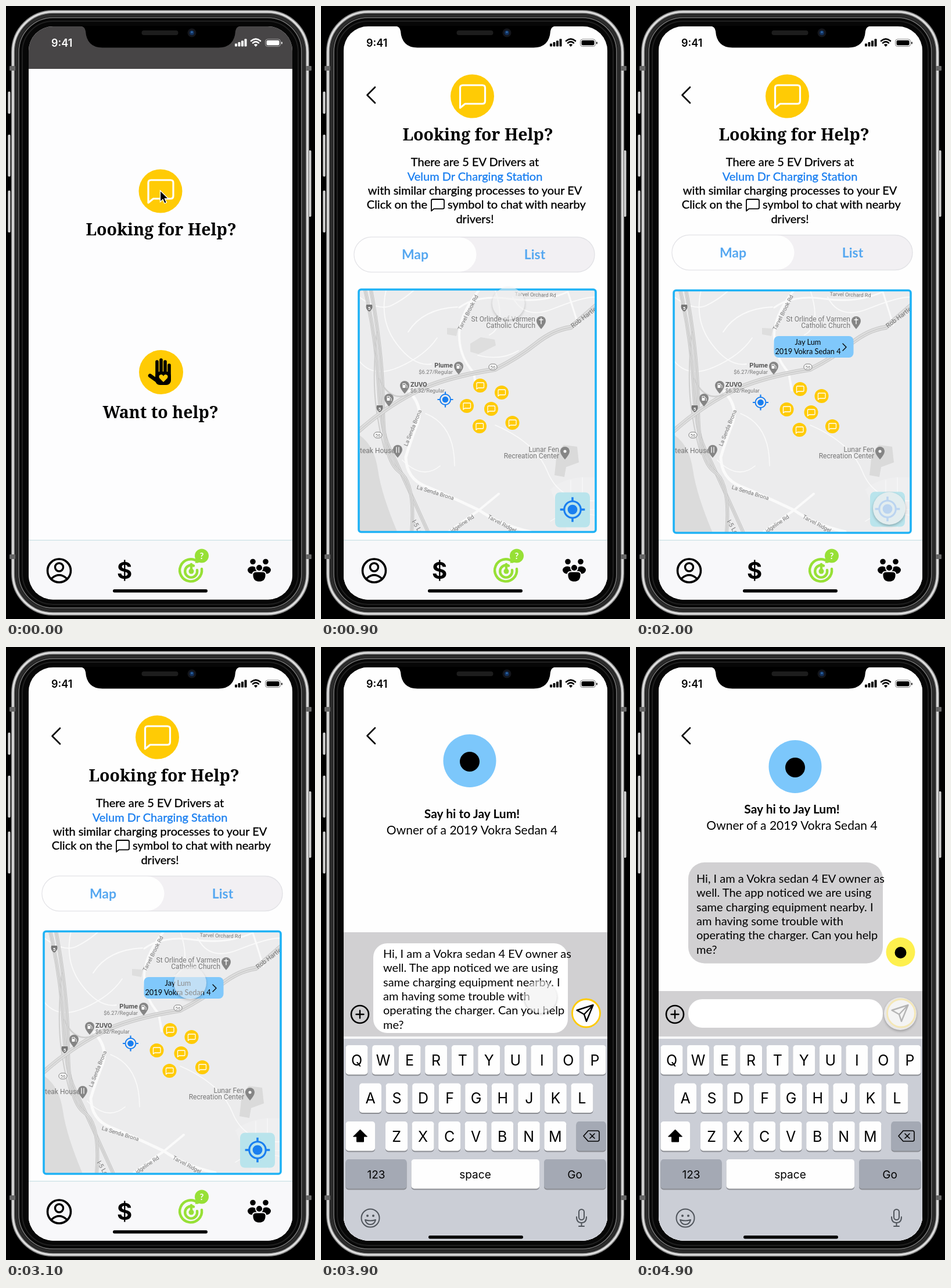
Recreate the animation shown at these times as an HTML page. Size 532x1053 px, loop 5000 ms.

```html
<!DOCTYPE html>
<html lang="en">
<head>
<meta charset="utf-8">
<title>Charging help prototype</title>
<style>
  html, body { margin: 0; width: 100%; height: 100%; overflow: hidden; background: #000; }
  svg { display: block; width: 100vw; height: 100vh; }
  text { font-family: Lato, sans-serif; white-space: pre; }
  .serif { font-family: "Noto Serif", serif; font-weight: 700; }
  .inter { font-family: Inter, sans-serif; }
  .map text { font-family: Roboto, sans-serif; fill: #777; }
  .mid { text-anchor: middle; }
  .end { text-anchor: end; }
  .bold { font-weight: 700; }
  .medium { stroke: currentColor; stroke-width: .35px; }
  .line { fill: none; stroke: #000; stroke-linecap: round; stroke-linejoin: round; }
  #touch { filter: drop-shadow(0 2px 2px rgba(0,0,0,.35)); }
</style>
</head>
<body>
<svg id="stage" viewBox="0 0 532 1053" xmlns="http://www.w3.org/2000/svg"></svg>
<script>
const YELLOW = '#ffcb05', BLUE = '#1a7ff0', SKY = '#7cc7fb', GREEN = '#97e036', PANEL = '#d1d0d2';

const text = (x, y, s, size, cls = '', attrs = '') =>
  `<text x="${x}" y="${y}" font-size="${size}" class="${cls}" ${attrs}>${s}</text>`;
const rect = (x, y, w, h, r, fill, attrs = '') =>
  `<rect x="${x}" y="${y}" width="${w}" height="${h}" rx="${r}" fill="${fill}" ${attrs}/>`;
const disc = (x, y, r, fill, attrs = '') => `<circle cx="${x}" cy="${y}" r="${r}" fill="${fill}" ${attrs}/>`;
const line = (d, width, color = '#000') => `<path class="line" d="${d}" stroke-width="${width}" style="stroke:${color}"/>`;
const group = (id, body, attrs = '') => `<g id="${id}" ${attrs}>${body}</g>`;

function chatIcon(x, y, w, h, color, width) {
  const r = h * .12, bottom = y + h * .82;
  return line(`M${x} ${y + h}V${y + r}q0 ${-r} ${r} ${-r}H${x + w - r}q${r} 0 ${r} ${r}V${bottom - r}q0 ${r} ${-r} ${r}H${x + h * .22}Z`, width, color);
}
const chatBadge = (x, y) => disc(x, y, 37.5, YELLOW) + chatIcon(x - 21, y - 19, 43, 39, '#fff', 3.2);
const chatDot = ([x, y]) => disc(x, y, 12, YELLOW) + chatIcon(x - 6, y - 5, 12.5, 11, '#fff', 1.3);
const chevron = y => line(`M93 ${y - 13.5}L79.5 ${y}L93 ${y + 13.5}`, 2.6);

function target(x, y, s) {
  return `<g transform="translate(${x} ${y}) scale(${s})">` + disc(0, 0, 5.3, BLUE) +
    disc(0, 0, 9, 'none', `stroke="${BLUE}" stroke-width="2"`) +
    `<path d="M0-13.5v4.5M0 9v4.5M-13.5 0h4.5M9 0h4.5" stroke="${BLUE}" stroke-width="2.2"/></g>`;
}

function status(color) {
  const bars = [5, 7.5, 10, 13].map((h, i) => rect(394 + i * 5.5, 69.5 - h, 4, h, 1, color)).join('');
  return text(78, 69.5, '9:41', 18, 'inter', `font-weight="600" fill="${color}"`) + bars +
    `<path d="M430 70l-3.2-3.4q3.2-2.6 6.4 0z" fill="${color}"/>` +
    line('M425 63.4q5-4.2 10 0M422 60q8-6.6 16 0', 2.6, color) +
    rect(446.5, 57, 26, 12.5, 4, 'none', `stroke="${color}" stroke-opacity=".5"`) +
    rect(448.5, 59, 22, 8.5, 2.2, color) + rect(474, 61.5, 1.6, 4, .8, color);
}

function nav() {
  const people = [425, 447].map(x => disc(x, 954.5, 4.8, '#000') +
    `<ellipse cx="${x + (x < 436 ? -1 : 1)}" cy="969" rx="8" ry="6.5"/>`).join('');
  return rect(39, 917, 454, 103, 0, '#f8f8fa') + rect(39, 917, 454, 1.2, 0, '#c9e0e4') +
    disc(91.5, 970, 20, 'none', 'stroke="#000" stroke-width="3.6"') +
    disc(91.5, 964, 7, 'none', 'stroke="#000" stroke-width="3.4"') +
    line('M79 983q12.5-11 25 0', 3.4) +
    text(204, 984, '$', 40, 'mid inter bold') +
    line('M330 954.5A19 19 0 1 0 337 967M323 961.5A10.5 10.5 0 1 0 329 969M319 971V959', 4.4, GREEN) +
    disc(319, 971, 4.5, GREEN) + disc(337, 944.5, 12, GREEN) +
    `<path d="M326 946v11l10-2z" fill="${GREEN}"/>` +
    text(337, 950, '?', 15, 'mid bold', 'fill="#fff"') + people +
    `<path d="M424.5 977q0-5.5 6-5.5h11q6 0 6 5.5q0 12.5-11.5 12.5t-11.5-12.5z" stroke="#f8f8fa" stroke-width="1.8"/>` +
    disc(436, 965, 6, '#000', 'stroke="#f8f8fa" stroke-width="1.8"') +
    rect(184, 1002, 163, 5.5, 2.7, '#000');
}

function home() {
  const fingers = line('M260 611V634M267 608V632M274 611V632M281 617V635', 5.6) + line('M248 635L262 645', 6.5);
  return rect(39, 35, 454, 985, 0, '#fdfdfe') + rect(39, 35, 454, 73, 0, '#474546') + status('#fff') +
    chatBadge(266, 318) + text(267, 394, 'Looking for Help?', 28.5, 'serif mid') +
    disc(267, 629, 38, YELLOW) + fingers + rect(257, 628, 27, 23, 8, '#000') +
    `<path d="M271 646l-7-7q-2-5 3-6q3 0 4 3q1-3 4-3q5 1 3 6z" fill="${YELLOW}"/>` +
    text(266, 708, 'Want to help?', 28.5, 'serif mid') + nav();
}

function pin(x, y, glyph = '') {
  return `<path d="M${x - 8} ${y - 1}a8 8 0 0 1 16 0q0 5-8 14q-8-9-8-14z" fill="#858585"/>` + glyph;
}
const fuel = (x, y) => pin(x, y, rect(x - 3.5, y - 5, 5, 8, .8, '#fff') +
  line(`M${x + 2} ${y - 3}l2 2v4`, 1, '#fff') + rect(x - 2.5, y - 4, 3, 2, 0, '#858585'));

function map() {
  const road = (d, w = 4) => line(d, w, '#fafafa');
  const freeway = (d, w = 7) => line(d, w, '#c6c6c6') + line(d, w - 2, '#dedede') + line(d, 1, '#c2c2c2');
  const tilted = (x, y, angle, s, size = 9.5) =>
    text(0, 0, s, size, 'mid', `transform="translate(${x} ${y}) rotate(${angle})"`);
  const oval = (x, y) => rect(x - 7, y - 5, 14, 10, 5, '#fff', 'stroke="#777"') + text(x, y + 3, '56', 8, 'mid');
  const shield = (x, y) => `<path d="M${x - 5} ${y - 6}h10q2 8-5 12q-7-4-5-12z" fill="#777"/>` +
    text(x, y + 3, '5', 8, 'mid bold', 'style="fill:#fff"');
  return rect(65, 487, 408, 418, 4, '#ececed') +
    '<path d="M66 737q26 18 32 60t34 108H66z" fill="#dbdbdb"/>' +
    '<path d="M402 806l4-38 12-14 23 3 3 27-22 8-3 17z" fill="#dadada"/>' +
    '<path d="M257 580l18-11 24 4 2 10-30 15-14-4zM217 553l19 1-3 13-16-3z" fill="#dedede"/>' +
    '<path d="M395 830q30-25 77-20v92h-48z" fill="#efeff0"/>' +
    road('M66 500Q100 525 122 514T160 488M112 488Q100 540 130 580T190 615', 1.8) +
    road('M150 560Q175 520 235 517M300 488Q320 550 290 565M330 500Q350 540 400 520T472 500', 1.8) +
    road('M66 610Q90 640 135 620T200 570M270 600Q310 610 340 592M180 700Q230 720 230 790', 1.6) +
    road('M300 720Q370 750 390 800T472 850M140 780Q175 815 205 790', 1.6) +
    road('M405 850h60M410 865h62M430 815v70M450 810v85M395 885q30-20 77-10', 1.2) +
    road('M272 488Q238 530 238 566T263 630L268 660', 4) +
    road('M238 518Q270 495 325 503T425 491L443 548', 3) +
    road('M152 662Q177 690 166 717T146 775Q147 812 180 825T272 866Q310 892 360 903', 5) +
    road('M220 903L272 866L306 838', 4) +
    freeway('M76 488Q95 570 99 650T118 760T185 905', 6) +
    freeway('M86 488Q107 600 107 690T135 800T156 905', 6) +
    line('M96 560Q88 640 95 690T112 770', 2, '#cfcfcf') +
    freeway('M66 729Q110 690 160 664T300 624Q340 604 370 580T430 552L474 514', 8) +
    line('M100 640Q118 680 150 668', 2.5, '#cfcfcf') +
    tilted(369, 499, 2, 'Tarvel Orchard Rd', 9) + tilted(256, 528, -63, 'Tarvel Brook Rd') +
    tilted(457, 536, -37, 'Rob Hartlen', 11) + tilted(161, 726, -68, 'La Senda Brona') +
    tilted(196, 839, 17, 'La Senda Brona') + tilted(163, 897, 60, 'I-5 Lo', 11) +
    tilted(245, 892, -34, 'idgeline Rd') + tilted(310, 892, 28, 'Tarvel Ridgel') +
    text(369, 542, 'St Orlinde of Varmen', 12, 'end') + text(369, 553, 'Catholic Church', 12, 'end') +
    pin(379, 542, line('M379 536v10M376 539h6', 1.4, '#fff')) +
    text(227, 621, 'Plume', 11, 'end bold', 'style="fill:#555"') + text(227, 631.5, '$6.27/Regular', 9.3, 'end') + fuel(237, 620) +
    text(154, 654, 'ZUVO', 11, 'bold', 'style="fill:#555"') + text(154, 664, '$6.32/Regular', 9.3) + fuel(144, 653) + fuel(117, 675) +
    text(67, 768, 'teak House', 12) + pin(132, 763, line('M130 758v9M134 758v9', 1.3, '#fff')) +
    text(410, 766, 'Lunar Fen', 12, 'end') + text(410, 777, 'Recreation Center', 12, 'end') +
    pin(420, 766, disc(420, 765, 2.5, '#fff')) +
    oval(296, 620) + oval(98, 737) + shield(83, 519) + shield(101, 692);
}

function help() {
  const dots = [[274, 652], [311, 664], [251, 687], [293, 692], [273, 722], [329.5, 716]];
  const body = (y, s, attrs) => text(265, y, s, 20, 'mid medium', attrs);
  const tab = `fill="#55a7f0" style="color:#55a7f0"`;
  return rect(39, 35, 454, 985, 0, '#fefefe') + status('#000') + chevron(153) + chatBadge(260.5, 155) +
    group('helpTitle', text(270, 231, 'Looking for Help?', 28.5, 'serif mid')) +
    body(275, 'There are 5 EV Drivers at') +
    body(299.5, 'Velum Dr Charging Station', `fill="${BLUE}" style="color:${BLUE}"`) +
    body(323.5, 'with similar charging processes to your EV') +
    text(183, 348, 'Click on the', 20, 'end medium') + chatIcon(190, 332, 22, 20, '#000', 1.8) +
    text(218, 348, 'symbol to chat with nearby', 20, 'medium') + body(372.5, 'drivers!') +
    group('toggle', rect(57, 397, 414, 60, 30, '#f2f0f3', 'stroke="#e2e2e6" stroke-width="1.4"') +
      rect(57.5, 397.5, 210, 59, 29.5, '#fefefe') +
      text(162, 435, 'Map', 23, 'mid bold', tab) + text(368, 435, 'List', 23, 'mid bold', tab)) +
    `<g class="map" clip-path="url(#mapClip)">${map()}</g>` +
    group('mapBorder', rect(65, 487, 408, 416.5, 4, 'none', 'stroke="#1fb2f5" stroke-width="3.6"')) +
    group('here', target(214, 676, 1)) + group('dots', dots.map(chatDot).join('')) +
    group('locate', rect(403, 835.5, 60, 60, 8, '#b9e4ec') + target(433, 865, 1.58)) +
    group('popup', rect(237.5, 567, 137, 37, 8, '#80c8fb') + text(296, 582, 'Jay Lum', 12.8, 'mid') +
      text(296, 598, '2019 Vokra Sedan 4', 12.8, 'mid') + line('M356 580l6 6l-6 6', 1.4)) + nav();
}

function keyboard() {
  const key = (x, y, w, fill = '#fefefe') => rect(x, y + 1.5, w, 51, 5, '#8b8d93') + rect(x, y, w, 50.5, 5, fill);
  const row = (letters, x, y) => [...letters].map((c, i) => {
    const cx = x + i * 45.55;
    return key(cx - 19, y, 38) + text(cx, y + 34.5, c, 25, 'mid inter');
  }).join('');
  const GREY = '#a4a9b4';
  return rect(39, 669, 454, 5, 0, '#f7f7f8') + rect(39, 673, 454, 347, 0, '#cbced6') +
    row('QWERTYUIOP', 61.5, 684) + row('ASDFGHJKL', 85, 749.5) + row('ZXCVBNM', 130, 815) +
    key(42.5, 815, 50.5) + '<path d="M67.5 829l12 12h-6v9h-12v-9h-6z" stroke="#000" stroke-linejoin="round"/>' +
    key(439.5, 815, 51, GREY) + line('M452 840l8-9h16q3 0 3 3v12q0 3-3 3h-16zM463 836l8 8M471 836l-8 8', 1.6) +
    key(42.5, 880, 105, GREY) + key(155.5, 880, 220.5) + key(384, 880, 106.5, GREY) +
    text(95, 913, '123', 19, 'mid inter') + text(265.5, 913, 'space', 19, 'mid inter') + text(437, 913, 'Go', 19, 'mid inter') +
    line('M69.5 981a15.5 15.5 0 1 0 31 0a15.5 15.5 0 1 0-31 0M76 984q9 3 18 0q-2 8-9 8t-9-8', 2, '#50555c') +
    disc(80, 977, 2, '#50555c') + disc(90, 977, 2, '#50555c') +
    rect(444, 966, 9, 18, 4.5, 'none', 'stroke="#50555c" stroke-width="2"') +
    line('M440 979q0 10 8.5 10t8.5-10M448.5 989v6M444 995h9', 2, '#50555c') +
    rect(185, 1011, 163, 5.5, 2.7, '#000');
}

function chat() {
  const message = ['Hi, I am a Vokra sedan 4 EV owner as', 'well. The app noticed we are using',
    'same charging equipment nearby. I', 'am having some trouble with', 'operating the charger. Can you help', 'me?'];
  return rect(39, 35, 454, 985, 0, '#fefefe') + status('#000') + chevron(152.5) +
    group('avatar', disc(256, 195.5, 45.5, SKY) + disc(256, 197, 17, '#000')) +
    group('greeting', text(260, 294, 'Say hi to Jay Lum!', 21, 'mid bold') +
      text(260, 322, 'Owner of a 2019 Vokra Sedan 4', 21, 'mid')) +
    rect(39, 490, 454, 180, 0, PANEL, 'id="panel"') + rect(90, 509, 335, 154, 24, '#fff', 'id="input"') +
    group('bubble', rect(90, 370, 335, 173.5, 28, PANEL) + disc(455.5, 524, 25, '#fef04e') + disc(455.5, 525, 10, '#000')) +
    group('message', message.map((s, i) => text(107, 534 + i * 24.3, s, 20)).join('')) +
    disc(67, 631, 15, 'none', 'stroke="#000" stroke-width="2.6"') + line('M60.5 631h13M67 624.5v13', 2.4) +
    disc(456.5, 629, 24, '#fefefe', `stroke="${YELLOW}" stroke-width="2.8"`) +
    line('M440.5 624L468.5 615L457 643L453 631ZM453 631L468.5 615', 2.4) + keyboard();
}

function phone() {
  const ring = (inset, color, width) =>
    rect(9 + inset, 7 + inset, 513 - 2 * inset, 1040 - 2 * inset, 72 - inset, 'none', `stroke="${color}" stroke-width="${width}"`);
  const buttons = [[3, 147, 38], [3, 221, 72], [3, 317, 72], [521, 248, 114]]
    .map(([x, y, h]) => rect(x, y, 5, h, 2, 'url(#steel)')).join('');
  const bands = [107, 946].map(y => rect(6, y - 4, 10, 8, 1, '#666') + rect(516, y - 4, 10, 8, 1, '#666')).join('');
  return rect(0, 0, 532, 1053, 0, '#000') + buttons + rect(9, 7, 513, 1040, 72, '#070707') +
    ring(3, '#8d8d8d', 6) + ring(3, '#e4e4e4', 2.6) + ring(9, '#2c2c2c', 5) + ring(13, '#777', 1.6) + ring(19, '#202020', 2) + bands;
}
const notch = '<path d="M127 34Q136 35 137 43Q139 71.5 166 71.5H366Q393 71.5 395 43Q396 35 405 34Z"/>' +
  rect(233.5, 42, 63, 8, 4, '#1d1d1d') + disc(320, 46, 7.5, '#14161c') + disc(320, 46, 4, '#12305c') + disc(320, 45, 1.8, '#2f6aa8');

stage.innerHTML = `<defs>
    <clipPath id="screenClip">${rect(39, 35, 454, 984.5, 42, '#000')}</clipPath>
    <clipPath id="mapClip">${rect(65, 487, 408, 417, 4, '#000')}</clipPath>
    <linearGradient id="steel"><stop stop-color="#777"/><stop offset=".5" stop-color="#eee"/><stop offset="1" stop-color="#666"/></linearGradient>
  </defs>` + phone() +
  `<g clip-path="url(#screenClip)">${group('home', home())}${group('help', help())}${group('chat', chat())}</g>` + notch +
  group('arrow', '<path d="M265.5 317v19.5l4.5-4.2 3 6.7 3.4-1.5-3-6.5h6.3z" stroke="#fff" stroke-width="1.3"/>') +
  disc(0, 0, 28, '#f1f1f1', 'id="touch"');

const $ = Object.fromEntries([...stage.querySelectorAll('[id]')].map(el => [el.id, el]));
const progress = (t, start, length) => Math.min(1, Math.max(0, (t - start) / length));
const easeOut = p => 1 - (1 - p) ** 2;
const smooth = p => p * p * (3 - 2 * p);
const move = (el, x, y) => el.setAttribute('transform', `translate(${x} ${y})`);
const set = (el, attrs) => Object.entries(attrs).forEach(([name, value]) => el.setAttribute(name, value));

// time, x, y, opacity
const touchPath = [[0, 266, 318, .55], [650, 266, 318, .55], [1300, 437, 898, .6], [1400, 437, 894, .6], [1600, 436, 863, .75],
  [2200, 436, 863, .75], [2900, 317, 583, .58], [3100, 317, 577, .58], [3500, 317, 577, .58], [3900, 378, 601, .62],
  [4300, 455, 630, .65], [4500, 455, 630, .75], [5000, 455, 630, .75]];

function slideIn(el, t, start) {
  el.style.display = t >= start ? '' : 'none';
  move(el, 454 * (1 - easeOut(progress(t, start, 300))), 0);
}

function render(t) {
  slideIn($.help, t, 240);
  slideIn($.chat, t, 3300);

  const found = easeOut(progress(t, 1650, 300));
  move($.helpTitle, 2 * found, 0);
  move($.toggle, 5 * found, -3.5 * found);
  move($.mapBorder, 0, 1.5 * found);
  move($.here, .5 * found, 5 * found);
  move($.dots, 8.5 * found, 6 * found);
  move($.locate, 0, -found);
  set($.popup, { opacity: found });

  const sent = easeOut(progress(t, 4500, 300));
  move($.avatar, 18 * sent, 10 * sent);
  move($.greeting, 8.5 * sent, -8.5 * sent);
  move($.message, -3 * sent, -129 * sent);
  set($.panel, { y: 490 + 101 * sent, height: 180 - 101 * sent });
  set($.input, { y: 509 + 96 * sent, height: 154 - 105 * sent });
  set($.bubble, { opacity: sent });

  const i = touchPath.findIndex(key => key[0] > t), from = touchPath[i - 1], to = touchPath[i];
  const p = smooth(progress(t, from[0], to[0] - from[0]));
  const [, x, y, opacity] = from.map((v, n) => v + (to[n] - v) * p);
  set($.touch, { cx: x, cy: y, opacity });
  $.touch.style.display = t >= 100 ? '' : 'none';
  $.arrow.style.display = t < 100 ? '' : 'none';
}

const began = performance.now();
function tick() {
  render((performance.now() - began) % 5000);
  requestAnimationFrame(tick);
}
tick();
</script>
</body>
</html>
```
